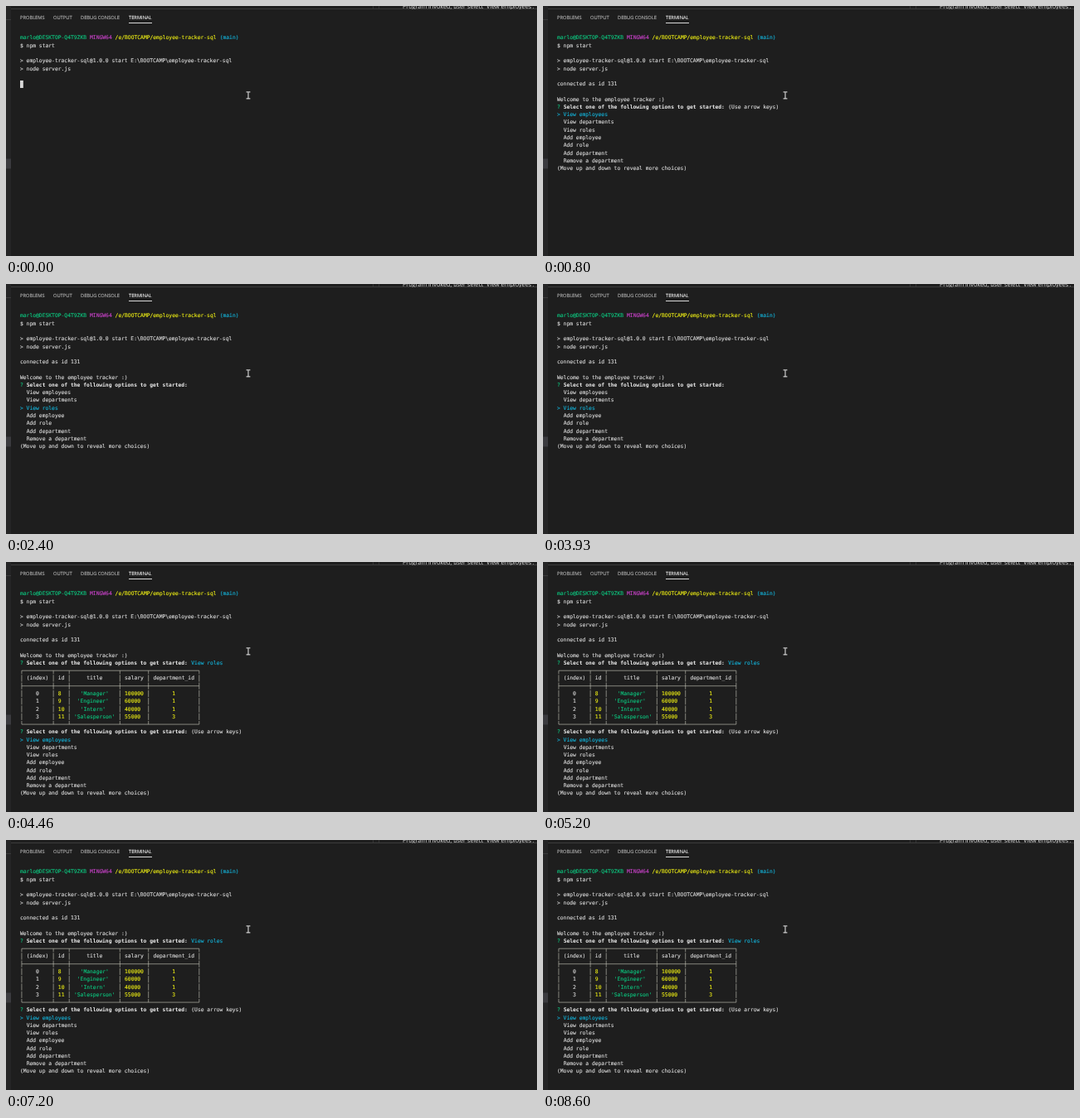
Recreate the animation shown at these times as an HTML page. Size 640 by 302 pixels, loop 8660 ms.

```html
<!DOCTYPE html>
<html lang="en">
<head>
<meta charset="utf-8">
<title>Employee tracker terminal</title>
<style>
  html, body { margin: 0; width: 100%; height: 100%; overflow: hidden; background: #1e1e1e; }
  svg { display: block; width: 640px; height: 302px; }
  text { white-space: pre; text-rendering: geometricPrecision; }
  .term { font: 6.345px "DejaVu Sans Mono", "Noto Sans Mono", monospace; }
  .term text { stroke-width: .14; }
  .term .bold { font-weight: 700; stroke-width: 0; }
  .tabs { font: 5.72px "Open Sans", "Noto Sans", sans-serif; fill: #b2b2b2; stroke: #b2b2b2; stroke-width: .12; }
  .note { font: 7.25px "Open Sans", "Noto Sans", sans-serif; fill: #dcdcdc; }
  .rule { stroke: #bebeb2; stroke-width: .65; fill: none; }
</style>
</head>
<body>
<svg viewBox="0 0 640 302">
  <rect width="640" height="302" fill="#1e1e1e"/>
  <rect width="6" height="302" fill="#252526"/>
  <rect y="16" width="6" height="1" fill="#3a3a3b"/>
  <rect y="184.5" width="6" height="12" fill="#3b3b3f"/>
  <path d="M442.5 0V3M449.5 0V3" stroke="#343434"/>
  <rect x="6" y="3" width="634" height="1" fill="#3c3c3c"/>
  <text class="note" x="478" y="3.2">Program invoked, user select 'View employees':</text>
  <rect x="6" y="4" width="634" height="2.5" fill="#1e1e1e"/>
  <g class="tabs">
    <text x="17" y="15.8">PROBLEMS</text>
    <text x="57" y="15.8">OUTPUT</text>
    <text x="90" y="15.8">DEBUG CONSOLE</text>
    <text x="148" y="15.8" fill="#eeeeee" stroke="#eeeeee">TERMINAL</text>
  </g>
  <rect x="148" y="20" width="28" height="1" fill="#d8d8d8"/>
  <g id="screen" class="term"></g>
  <path d="M289.6 103.8h1.8l.6.6.6-.6h1.8M292 104.2v7.2M289.6 111.8h1.8l.6-.6.6.6h1.8" fill="none" stroke="#cccccc" stroke-width="1.2"/>
</svg>
<script>
const LOOP = 8660, LEFT = 17, TOP = 38.5, CELL = 3.82, LINE = 9.27;
const FG = '#d8d8d8', GREEN = '#0dc47e', MAGENTA = '#c441c4',
      YELLOW = '#ecec14', CYAN = '#14b0d6', WHITE = '#f0f0f0';

const OPTIONS = ['View employees', 'View departments', 'View roles', 'Add employee',
                 'Add role', 'Add department', 'Remove a department'];
const QUESTION = 'Select one of the following options to get started:';
const HEAD = ['(index)', 'id', 'title', 'salary', 'department_id'];
const ROWS = [
  [0, 8, "'Manager'", 100000, 1],
  [1, 9, "'Engineer'", 60000, 1],
  [2, 10, "'Intern'", 40000, 1],
  [3, 11, "'Salesperson'", 55000, 3]
];

const colX = c => LEFT + c * CELL;
const rowY = r => TOP + r * LINE;

const put = (row, col, str, color = FG, cls = '') =>
  `<text class="${cls}" x="${colX(col)}" y="${rowY(row) + 1.95}" fill="${color}" stroke="${color}">${String(str).replace(/>/g, '&gt;')}</text>`;

const prompt = () =>
  put(0, 0, 'marlo@DESKTOP-Q4T9ZKB', GREEN) +
  put(0, 22, 'MINGW64', MAGENTA) +
  put(0, 30, '/e/BOOTCAMP/employee-tracker-sql', YELLOW) +
  put(0, 63, '(main)', CYAN) +
  put(1, 0, '$ npm start') +
  put(3, 0, '> employee-tracker-sql@1.0.0 start E:\\BOOTCAMP\\employee-tracker-sql') +
  put(4, 0, '> node server.js');

const cursor = () =>
  `<rect x="${LEFT}" y="${rowY(6) - 4.1}" width="${CELL}" height="9" fill="${FG}"/>`;

const greeting = () =>
  put(6, 0, 'connected as id 131') + put(8, 0, 'Welcome to the employee tracker :)');

const ask = (row, tail = '', color = FG) =>
  put(row, 0, '?', GREEN) + put(row, 2, QUESTION, WHITE, 'bold') + put(row, 54, tail, color);

const menu = (row, picked, hint) =>
  ask(row, hint ? '(Use arrow keys)' : '') +
  OPTIONS.map((name, i) => i === picked
    ? put(row + 1 + i, 0, '> ' + name, CYAN)
    : put(row + 1 + i, 2, name)).join('') +
  put(row + 8, 0, '(Move up and down to reveal more choices)');

function table(row) {
  const widths = HEAD.map((h, i) =>
    Math.max(h.length, ...ROWS.map(r => String(r[i]).length)) + 2);
  const edges = [0];
  widths.forEach(w => edges.push(edges[edges.length - 1] + w + 1));
  const xs = edges.map(e => colX(e + .5));
  const last = xs[xs.length - 1];
  const cells = (r, line, colorOf) => line.map((v, i) => {
    const pad = Math.floor((widths[i] - String(v).length) / 2);
    return put(r, edges[i] + 1 + pad, v, colorOf(v, i));
  }).join('');

  let path = '';
  for (const r of [0, 2, 7]) path += `M${xs[0]} ${rowY(row + r)}H${last}`;
  for (const x of xs) {
    for (let r = 0; r < 8; r++) {
      const up = r ? 4.1 : 0, down = r < 7 ? 4.1 : 0;
      path += `M${x} ${rowY(row + r) - up}v${up + down}`;
    }
  }
  return `<path class="rule" d="${path}"/>` +
    cells(row + 1, HEAD, () => FG) +
    ROWS.map((line, n) => cells(row + 3 + n, line, (v, i) =>
      i === 0 ? FG : typeof v === 'string' ? GREEN : YELLOW)).join('');
}

const choose = (picked, hint) => () => greeting() + menu(9, picked, hint);

const STEPS = [
  [0, cursor],
  [270, choose(0, true)],
  [1330, choose(1)],
  [2000, choose(2)],
  [4130, () => greeting() + ask(9, 'View roles', CYAN) + table(10) + menu(18, 0, true)]
];

const screen = document.getElementById('screen');
let shown = -1;

function show(now) {
  const t = now % LOOP;
  const step = STEPS.filter(s => s[0] <= t).length - 1;
  if (step !== shown) {
    shown = step;
    screen.innerHTML = prompt() + STEPS[step][1]();
  }
}

const start = performance.now();
function tick() {
  show(performance.now() - start);
  requestAnimationFrame(tick);
}
tick();
</script>
</body>
</html>
```
